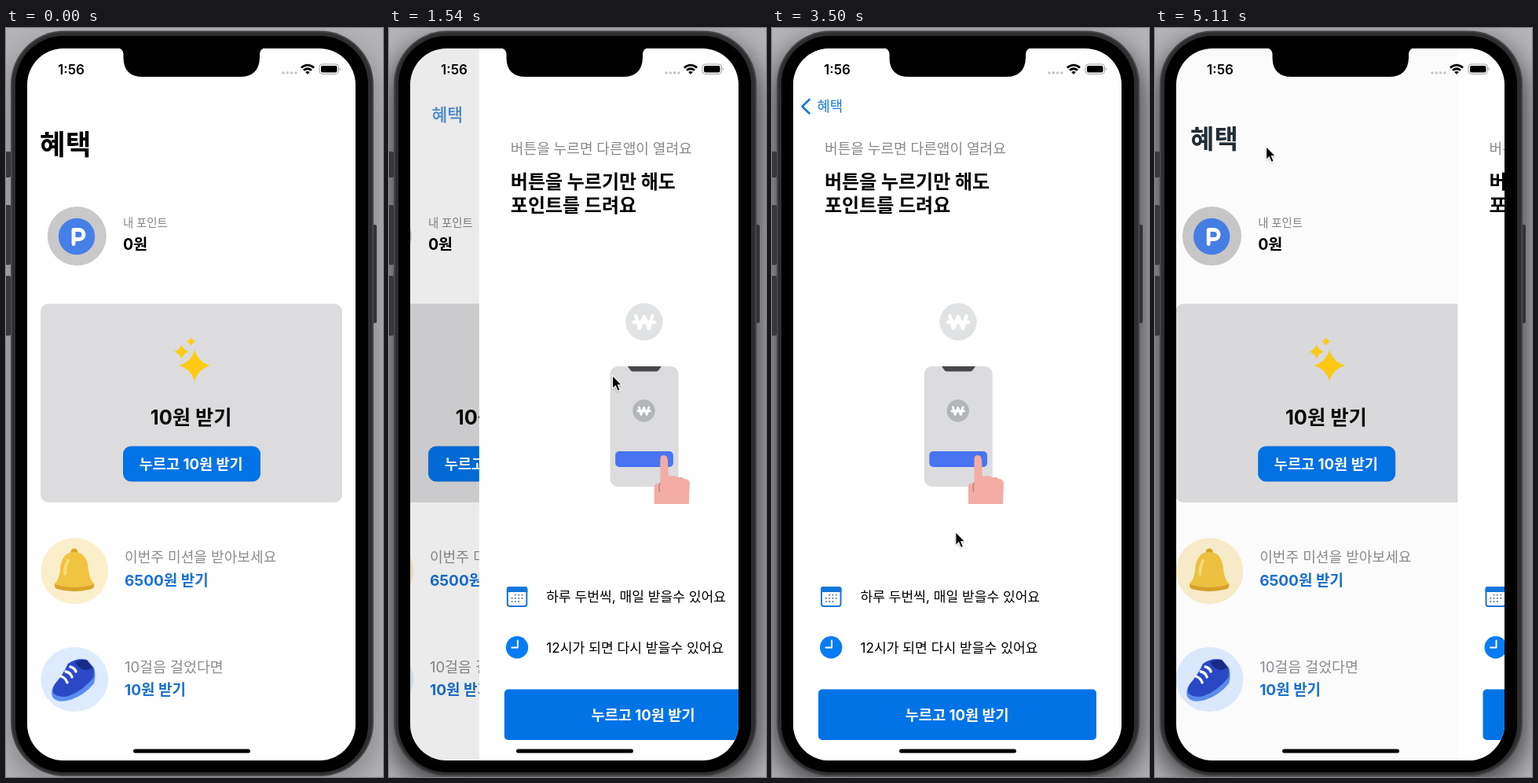
Animation of 480 by 952 pixels, one loop 5180 ms. Source, as an HTML page:

```html
<!DOCTYPE html>
<html lang="ko">
<head>
<meta charset="utf-8">
<title>혜택</title>
<style>
  html, body { margin: 0; width: 100%; height: 100%; overflow: hidden; background: #b4b4b7; }
  svg { display: block; width: 480px; height: 952px; }
  text { font-family: Inter, 'Noto Sans CJK KR', 'Noto Sans CJK', sans-serif; }
</style>
</head>
<body>
<svg id="stage" viewBox="0 0 480 952"></svg>
<script>
const LOOP = 5180, STEP = 70, WIDTH = 418;
const BLUE = '#0273e6', LINK = '#1b72d2', GREY = '#8c8c90';

// Text is placed by its vertical centre.
const text = (str, x, cy, size, weight = 400, fill = '#000', anchor = 'start') =>
  `<text x="${x}" y="${cy + size * 0.37}" font-size="${size}" font-weight="${weight}" fill="${fill}" text-anchor="${anchor}">${str}</text>`;
const rect = (x, y, w, h, r, fill, extra = '') =>
  `<rect x="${x}" y="${y}" width="${w}" height="${h}" rx="${r}" fill="${fill}" ${extra}/>`;
const circle = (x, y, r, fill) => `<circle cx="${x}" cy="${y}" r="${r}" fill="${fill}"/>`;
const path = (d, fill, extra = '') => `<path d="${d}" fill="${fill}" ${extra}/>`;
const line = (d, color, width) =>
  path(d, 'none', `stroke="${color}" stroke-width="${width}" stroke-linecap="round" stroke-linejoin="round"`);

const star = (x, y, r) => {
  const k = r * 0.22;
  return path(`M${x} ${y - r}Q${x + k} ${y - k} ${x + r} ${y}Q${x + k} ${y + k} ${x} ${y + r}` +
    `Q${x - k} ${y + k} ${x - r} ${y}Q${x - k} ${y - k} ${x} ${y - r}Z`, '#ffcb12');
};

const won = (x, y, r, fill) => circle(x, y, r, fill) +
  `<g transform="translate(${x} ${y}) scale(${r / 23.5})">` +
  line('M-10.5 -7.5L-6 8L0 -6.5L6 8L10.5 -7.5M-13 0.5H13', '#fff', 4.6) + '</g>';

const bell = () =>
  '<ellipse cx="87.3" cy="690.3" rx="43" ry="42" fill="#fbeecb"/>' +
  circle(87, 706, 9.5, '#91602f') + circle(87, 666, 4.5, '#d9a52b') +
  path('M87 666C74 666 70 677 69 688C68 699 65 703 62 706Q61 711 65 713Q87 719 109 713Q113 711 112 706C109 703 106 699 105 688C104 677 100 666 87 666Z', '#f0c341') +
  path('M62 707Q87 715 112 707Q113 711 109 713Q87 719 65 713Q61 711 62 707Z', '#d9a32c') +
  line('M79 677Q75 684 75 694', '#f9dc78', 4);

const shoe = () =>
  '<ellipse cx="87.3" cy="828" rx="43" ry="41" fill="#deebff"/>' +
  path('M79 808Q90 800 103 803L112 813Q115 822 112 833Q100 848 82 854Q65 859 59 850Q56 842 62 834Q72 822 79 808Z', '#5b8def') +
  path('M79 808Q90 800 103 803L111 813Q113 820 111 826Q98 842 80 849Q66 852 60 845Q59 838 63 833Q73 822 79 808Z', '#2b49c6') +
  path('M88 806Q96 801 103 804L110 813Q103 818 97 815Q91 812 88 806Z', '#182c86') +
  line('M82 812Q87 813 89 818M76 818Q82 819 84 825M70 824Q76 826 78 832', '#fff', 3.4);

const home = () => rect(27, 26, WIDTH, 905, 0, '#fff') +
  circle(90.3, 264.5, 37.5, '#c9c9c9') + circle(90, 265, 23.2, '#477fe8') +
  line('M86 274.5V256.5H93A6 6 0 0 1 93 268.5H86', '#fff', 4.8) +
  text('내 포인트', 149, 248, 14.4, 500, '#858588') +
  text('0원', 149, 274.5, 19.5, 700) +
  rect(44, 350.5, 384, 252.5, 10, '#dcdcde') +
  star(240, 429, 20) + star(223.5, 411.5, 9.5) + star(235.5, 398.5, 6) +
  text('10원 받기', 235.7, 494.5, 25.3, 700, '#0a0a0a', 'middle') +
  rect(149, 531.5, 175, 45, 10, BLUE) +
  text('누르고 10원 받기', 235.7, 553.7, 18.6, 700, '#fff', 'middle') +
  bell() + text('이번주 미션을 받아보세요', 151, 672.7, 18.1, 400, GREY) +
  text('6500원 받기', 151, 701.5, 19, 700, LINK) +
  shoe() + text('10걸음 걸었다면', 151, 812, 18.4, 400, GREY) +
  text('10원 받기', 151, 841, 19, 700, LINK);

const calendar = () => {
  let dots = '';
  for (let row = 0; row < 3; row++)
    for (let col = 0; col < 4; col++)
      if (row + col > 0 && row + col < 5) dots += circle(68.8 + col * 4.3, 720.5 + row * 4.3, 1.1, '#5f7f9f');
  return rect(63, 711, 24.5, 24, 3, '#fff', `stroke="#1477dc" stroke-width="2"`) +
    path('M62 717V713Q62 710 65 710H85.5Q88.5 710 88.5 713V717Z', '#1477dc') + dots;
};

const detail = () => rect(27, 26, WIDTH, 905, 0, '#fff') +
  text('버튼을 누르면 다른앱이 열려요', 67, 153.7, 18.1, 500, '#89898c') +
  text('버튼을 누르기만 해도', 67, 194.7, 24, 700) +
  text('포인트를 드려요', 67, 225.2, 24, 700) +
  won(237, 373.5, 23.7, '#e1e2e4') +
  rect(193.7, 430, 87, 153, 10, '#dcdcde') +
  path('M216 430H259L255 435.5Q254 436.5 252 436.5H223Q221 436.5 220 435.5Z', '#47474a') +
  won(236.7, 486.5, 14.2, '#b2b6b8') +
  rect(200.3, 538, 73.7, 20, 5, '#4874f2') +
  path('M257.5 549Q257 543 262 543Q266.500 543 267 549L268 570Q276 568 280 571Q286 570 288 573Q295 573 295 579L294 605H250V583Q250 578 257.500 579Z', '#f2aca4') +
  line('M257 578Q255 583 256.500 589', '#9a7672', 1) +
  calendar() + circle(75.2, 787.3, 14.2, '#087cf3') +
  line('M76 778.5V787.500H68.5', '#fff', 2) +
  text('하루 두번씩, 매일 받을수 있어요', 112.5, 722.7, 17.1) +
  text('12시가 되면 다시 받을수 있어요', 112.5, 787.2, 17.15) +
  rect(59, 840.5, 354, 64.5, 5, BLUE) +
  text('누르고 10원 받기', 235.7, 872.7, 18.6, 700, '#fff', 'middle');

const statusBar = () => text('1:56', 83, 52.5, 17, 600, '#000', 'middle') +
  [353, 358.3, 363.6, 368.9].map(x => circle(x, 57, 1.7, '#c4c4c6')).join('') +
  path('M375 49.500Q384 42 393 49.500L391.200 51.500Q384 45.700 376.800 51.500ZM378 52.700Q384 47.800 390 52.700L388 54.800Q384 51.500 380 54.800ZM381.200 56Q384 53.800 386.800 56L384 59Z', '#000') +
  rect(399, 46, 24.5, 12.5, 3.8, 'none', 'stroke="#9d9d9f"') +
  rect(401, 48, 20.5, 8.5, 2, '#000') + path('M424.800 50Q426.800 52.200 424.800 54.500Z', '#9d9d9f');

const buttons = () => [[157, 33], [225, 76], [315, 76]]
  .map(([y, h]) => rect(-2, y, 8, h, 2, '#38383a')).join('') + rect(466, 250, 6, 125, 2, '#333335');

document.getElementById('stage').innerHTML = `
  <defs>
    <clipPath id="screen"><rect x="27" y="26" width="${WIDTH}" height="905" rx="46"/></clipPath>
    <filter id="blur" x="-20%" y="-20%" width="140%" height="140%"><feGaussianBlur stdDeviation="18"/></filter>
    <filter id="soft" x="-50%" y="-50%" width="200%" height="200%"><feGaussianBlur stdDeviation="1"/></filter>
  </defs>
  ${rect(0, 0, 480, 952, 0, '#b4b4b7')}
  <g id="shadow" filter="url(#blur)">${rect(4, 20, 466, 940, 66, '#000')}</g>
  ${buttons()}
  ${rect(6, 3.5, 462, 947.5, 68, '#454548')}
  ${rect(8, 5.5, 458, 943.5, 66, '#2e2e31')}
  ${rect(12, 10, 449, 936, 61, '#000')}
  <g clip-path="url(#screen)">
    <g id="home">${home()}</g>
    ${rect(27, 26, WIDTH, 905, 0, '#000', 'id="dim"')}
    <g id="detail">${detail()}</g>
    <g id="title">
      <g id="large">${text('혜택', 0, 0, 35.5, 700)}</g>
      <g id="small">${text('혜택', 0, 0, 35.5, 400, '#1479e0')}</g>
    </g>
    <g id="chevron">${line('M47.500 91L38.500 99.700L47.500 108.500', '#1479e0', 2.6)}</g>
    ${statusBar()}
    ${rect(162, 916.5, 149, 5, 2.5, '#000')}
    ${path('M141 25Q149 26 149.500 33V38Q150 62 174 62H298Q322 62 323 38V33Q323.500 26 331 25Z', '#000')}
  </g>
  <g id="cursor">
    ${path('M0 2V19L4 15.500L7 22L10 20.700L7.200 14.500H12.500Z', '#000', 'opacity="0.3" filter="url(#soft)"')}
    ${path('M0.500 0.500V17.500L4.400 13.900L7.200 20.500L10.200 19.200L7.400 12.800H12.600Z', '#000', 'stroke="#fff" stroke-width="1.100"')}
  </g>`;

const el = Object.fromEntries(['shadow', 'home', 'dim', 'detail', 'title', 'large', 'small', 'chevron', 'cursor']
  .map(id => [id, document.getElementById(id)]));
const set = (node, attrs) => Object.entries(attrs).forEach(([key, value]) => node.setAttribute(key, value));
const lerp = (a, b, k) => a + (b - a) * k;

// Pointer waypoints: time, x, y
const TRACK = [
  [350, 250, 921], [560, 290, 760], [700, 307, 610], [840, 284, 462], [980, 284, 441],
  [2310, 284, 441], [2450, 283, 495], [2660, 279, 690], [2800, 275, 787], [2870, 273, 810], [3150, 287, 883],
  [3220, 287, 883], [3430, 255, 730], [3640, 190, 460], [3780, 162, 361],
  [3990, 135, 250], [4130, 112, 160], [4270, 93, 117], [4340, 79, 102], [4480, 68, 91],
  [4550, 68, 91], [4690, 71, 92], [4900, 71, 92], [5110, 141, 150]
];

function pointerAt(t) {
  const next = TRACK.findIndex(point => point[0] > t);
  if (next < 0) return TRACK[TRACK.length - 1].slice(1);
  const a = TRACK[Math.max(0, next - 1)], b = TRACK[next];
  const k = Math.max(0, (t - a[0]) / (b[0] - a[0]));
  return [lerp(a[1], b[1], k), lerp(a[2], b[2], k)];
}

// Critically damped spring from 0 to 1
function spring(ms) {
  const u = Math.max(0, ms) * 0.0183;
  return 1 - (1 + u) * Math.exp(-u);
}

function draw(t) {
  const p = t < 4922 ? (t > 2100 ? 1 : spring(t - 1380)) : 1 - spring(t - 4922);
  const [x, y] = pointerAt(t);
  set(el.shadow, { opacity: t < 1260 ? 0.28 : 0.72 });
  set(el.home, { transform: `translate(${-0.3 * WIDTH * p} 0)` });
  set(el.dim, { opacity: 0.1 * p });
  set(el.detail, { transform: `translate(${WIDTH * (1 - p)} 0)` });
  set(el.title, { transform: `translate(${lerp(43, 57.5, p)} ${lerp(148, 99.5, p)}) scale(${lerp(1, 0.5, p)})` });
  set(el.large, { opacity: 1 - p });
  set(el.small, { opacity: p });
  set(el.chevron, { opacity: Math.max(0, (p - 0.82) / 0.18) });
  set(el.cursor, { transform: `translate(${x} ${y})`, visibility: t < 350 ? 'hidden' : 'visible' });
}

const start = performance.now();
function tick() {
  const t = (performance.now() - start) % LOOP;
  draw(Math.floor(t / STEP) * STEP);
  requestAnimationFrame(tick);
}
tick();
</script>
</body>
</html>
```
